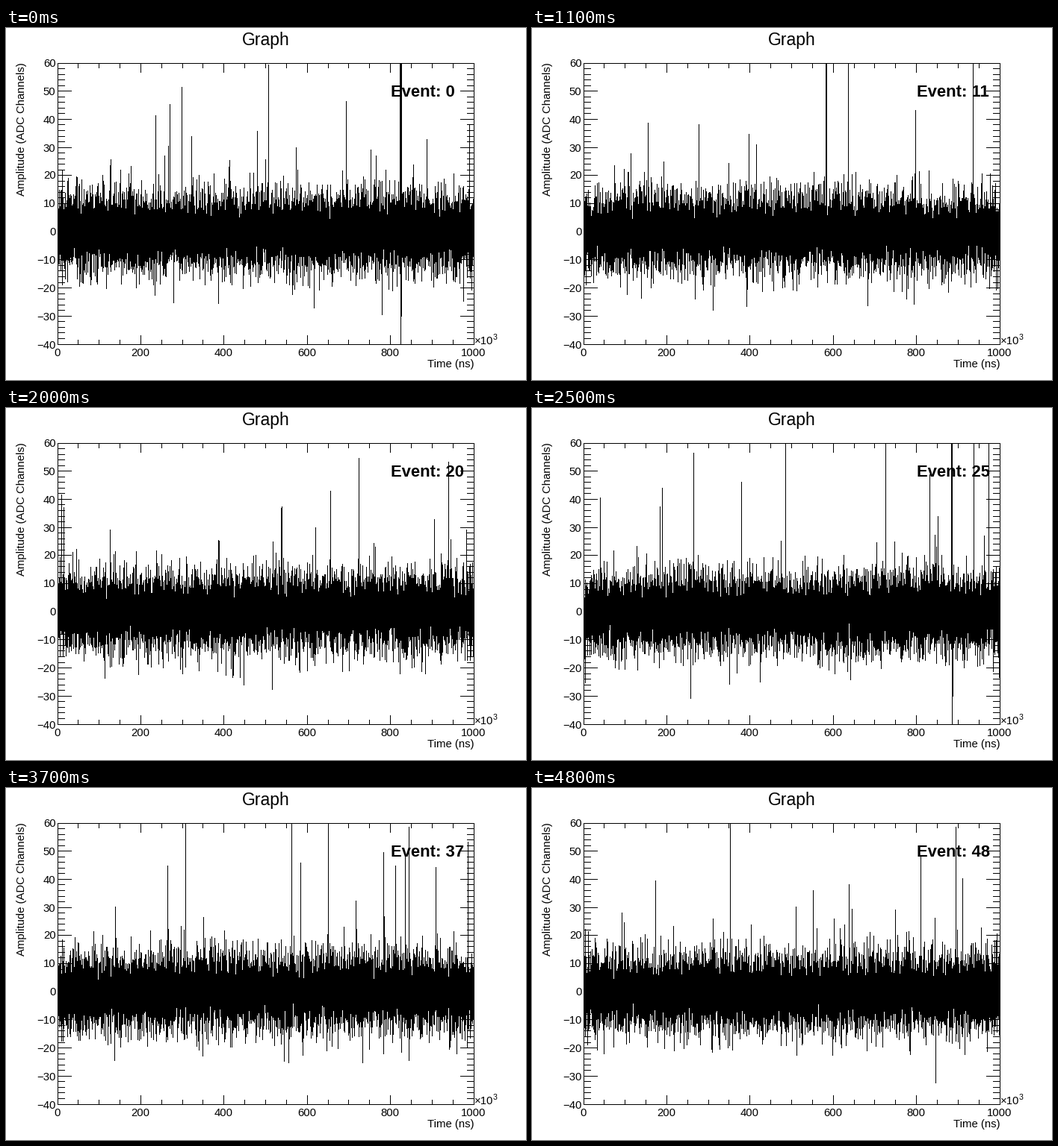
A matplotlib script that plays this animation: 696 px wide and 472 px high, repeating every 4.9 s.

```python
import numpy as np
import matplotlib.pyplot as plt
from matplotlib.animation import FuncAnimation
from matplotlib.collections import LineCollection

W, H, DPI = 696, 472, 100
PX = 72 / DPI
LEFT, RIGHT, TOP, BOTTOM = 69, 626, 47, 424
Y_MAX, Y_MIN = 60, -40
EVENTS, STEP_MS = 49, 100

# Events with a wide saturated pulse, and the column where it starts
BURSTS = {0: 527, 4: 300, 22: 240, 25: 561, 33: 450, 40: 380}

plt.rcParams["font.family"] = "Liberation Sans"


def to_x(t):
    return LEFT + t * (RIGHT - LEFT) / 1000


def to_y(v):
    return TOP + (Y_MAX - v) * (BOTTOM - TOP) / (Y_MAX - Y_MIN)


def waveform(event):
    """One vertical stroke per pixel column, from its minimum to its maximum."""
    rng = np.random.default_rng(100 + event)
    cols = np.arange(LEFT + 1, RIGHT)
    high = rng.gamma(12, 1.03, cols.size)
    low = -rng.gamma(12, 1.03, cols.size)

    # Isolated pulses, mostly upwards
    n = rng.poisson(13)
    high[rng.integers(0, cols.size, n)] = 24 + rng.exponential(18, n)
    low[rng.integers(0, cols.size, 2)] = -22 - rng.exponential(4, 2)

    if event in BURSTS:
        i = BURSTS[event] - cols[0]
        high[i:i + rng.integers(2, 5)] = Y_MAX
        low[i + 1:i + 3] = Y_MIN, -30

    high, low = np.minimum(high, Y_MAX), np.maximum(low, Y_MIN)
    return np.stack([np.column_stack([cols, to_y(high)]),
                     np.column_stack([cols, to_y(low)])], axis=1)


fig = plt.figure(figsize=(W / DPI, H / DPI), dpi=DPI, facecolor="white")
ax = fig.add_axes([0, 0, 1, 1])
ax.set_xlim(0, W)
ax.set_ylim(H, 0)
ax.axis("off")


def strokes(segments=()):
    # Whole coordinates snap to the centre of their pixel
    lines = LineCollection(segments, colors="black", linewidths=PX,
                           antialiaseds=False, capstyle="butt", snap=True)
    ax.add_collection(lines, autolim=False)
    return lines


def label(x, y, text, size=14.9, **kw):
    return ax.text(x, y, text, fontsize=size * PX, color="black",
                   va="baseline", **kw)


def draw_axes():
    l, r, t, b = LEFT, RIGHT, TOP, BOTTOM
    segs = [[(l, t), (r, t)], [(l, b), (r, b)],
            [(l, t), (l, b)], [(r, t), (r, b)]]
    for v in range(0, 1001, 50):
        x = int(to_x(v))
        n = 6 if v % 200 else 12
        segs += [[(x, b), (x, b - n)], [(x, t), (x, t + n)]]
        if v % 200 == 0:
            label(x, 440.5, str(v), ha="center")
    for v in range(Y_MIN, Y_MAX + 1, 2):
        y = int(to_y(v))
        n = 9 if v % 10 else 18
        segs += [[(l, y), (l + n, y)], [(r, y), (r - n, y)]]
        if v % 10 == 0:
            label(66.5, y + 5.5, str(v).replace("-", "\u2212"), ha="right")
    strokes(segs)


draw_axes()
label(348, 23.5, "Graph", 23, ha="center")
label(626, 455, "Time (ns)", ha="right")
label(25, 46.5, "Amplitude (ADC Channels)", rotation=90, ha="right",
      rotation_mode="anchor")
label(627, 424.5, "\u00d710")
label(652, 418, "3", 10.5)

trace = strokes()
counter = label(515, 92, "", 22, weight="bold")


def update(event):
    trace.set_segments(waveform(event))
    counter.set_text(f"Event: {event}")
    return trace, counter


anim = FuncAnimation(fig, update, frames=EVENTS, interval=STEP_MS,
                     repeat=True, repeat_delay=0, blit=False)
plt.show()
```
